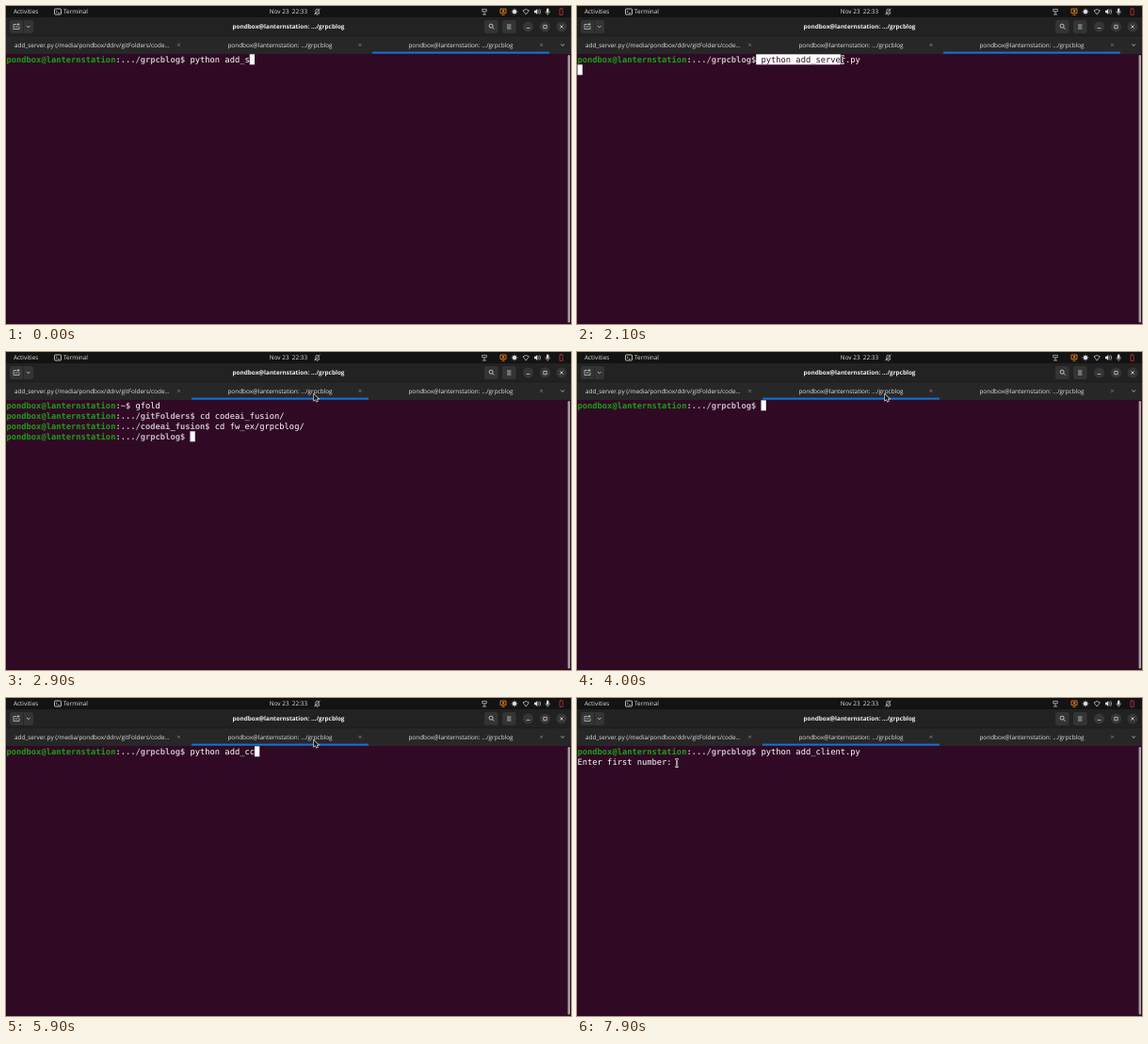
An HTML page with a canvas for the animation above (8000 ms loop, 600 by 338 pixels).

```html
<!DOCTYPE html>
<html lang="en">
<head>
<meta charset="utf-8">
<title>Terminal</title>
<style>
  html, body { margin: 0; width: 100%; height: 100%; overflow: hidden; background: #300a24; }
  canvas { display: block; width: 600px; height: 338px; }
</style>
</head>
<body>
<canvas id="stage" width="600" height="338"></canvas>
<script>
const LOOP = 8000, BLINK = 400, SWITCH = 2800;
const CELL = 5.27, ROW = 11, LEFT = 0.5, TOP = 51.3;
const USER = 'pondbox', HOST = USER + '@lanternstation';
const UI = '"Open Sans", "Noto Sans", sans-serif';
const MONO = '"DejaVu Sans Mono", monospace';
const c = document.getElementById('stage').getContext('2d');
c.textRendering = 'geometricPrecision';

// Terminal contents: each event replaces the rows; the cursor follows the last one.
const events = [];
const show = (t, ...rows) => events.push({ t, rows });
const prompt = (text, dir = '.../grpcblog') => ({ dir, text });
const output = text => ({ text });
function type(start, step, text, before = []) {
  for (let n = 1; n <= text.length; n++)
    show(start + (n - 1) * step, ...before, prompt(text.slice(0, n)));
}

const server = 'python add_server.py ', client = 'python add_client.py ';
show(0, prompt('python add_s'));
show(100, prompt('python add_se'));
show(300, prompt(server));
show(500, prompt(server), output(''));

const history = [
  prompt('gfold', '~'),
  prompt('cd codeai_fusion/', '.../gitFolders'),
  prompt('cd fw_ex/grpcblog/', '.../codeai_fusion')
];
show(SWITCH, ...history, prompt(''));
type(3100, 110, 'clear', history);
show(3800, prompt(''));
type(4500, 110, 'python add_cc');
show(6100, prompt('python add_c'));
show(6200, prompt('python add_cl'));
show(6300, prompt(client));
show(6400, prompt(client), output(''));
const asked = 7850;
show(asked, prompt(client), output('Enter first number: '));

// Mouse: time, x, y
const path = [
  [1000, 376, 190], [1800, 190, 57], [1900, 190, 57], [2100, 282, 57], [2250, 300, 58],
  [2450, 340, 193], [2700, 327, 45], [7100, 327, 45], [7500, 215, 77], [7800, 180, 67], [7900, 106, 69]
];
const select = { from: 1900, drop: 2250, until: 2450, start: 36 };

function mouseAt(t) {
  const i = path.findIndex(p => p[0] > t);
  if (i < 0) return path[path.length - 1].slice(1);
  const [t0, x0, y0] = path[i - 1], [t1, x1, y1] = path[i];
  let k = (t - t0) / (t1 - t0);
  k = k * k * (3 - 2 * k);
  return [x0 + (x1 - x0) * k, y0 + (y1 - y0) * k];
}

function rect(x, y, w, h, color) {
  c.fillStyle = color;
  c.fillRect(x, y, w, h);
}
function pill(x, y, w, h, r, color) {
  c.fillStyle = color;
  c.beginPath();
  c.roundRect(x, y, w, h, r);
  c.fill();
}
function stroke(d, color = '#e4e4e4', width = 0.8) {
  c.strokeStyle = color;
  c.lineWidth = width;
  c.stroke(new Path2D(d));
}
function fill(d, color = '#e4e4e4') {
  c.fillStyle = color;
  c.fill(new Path2D(d));
}
function text(s, x, y, color, font, align = 'left') {
  c.font = font;
  c.textAlign = align;
  c.fillStyle = color;
  c.fillText(s, x, y);
}
const label = (s, x, y, align, weight = 400, color = '#e2e2e2') =>
  text(s, x, y, color, `${weight} 6.4px ${UI}`, align);
const cross = (x, y, r, color) =>
  stroke(`M${x - r} ${y - r}l${2 * r} ${2 * r}m0 ${-2 * r}l${-2 * r} ${2 * r}`, color);

function topBar() {
  rect(0, 0, 600, 12, '#131313');
  label('Activities', 8, 8.3);
  stroke('M52.5 3h5a1 1 0 0 1 1 1v4a1 1 0 0 1-1 1h-5a1 1 0 0 1-1-1v-4a1 1 0 0 1 1-1z');
  stroke('M53 4.7l1.3 1.2l-1.3 1.2M55 7.4h2', '#e4e4e4', 0.6);
  label('Terminal', 61, 8.3);
  label('Nov 23  22:33', 300, 8.3, 'center');
  // muted bell
  stroke('M328 8h5l-.8-1.2v-1.8a1.7 1.7 0 0 0-3.4 0v1.8zM327.5 9.3l6-6.6M329.8 9.3h1.4', '#d8d8d8', 0.7);
  // network
  stroke('M505.7 3.4h4.6v2.4h-4.6zM508 5.8v3.2M506 9h4', '#cfcfcf', 0.7);
  // screen
  stroke('M525 3h6v4.6h-6zM526.5 9.3h3', '#e8801c', 0.9);
  fill('M527 4.3h2.3v2h-2.3z', '#e8801c');
  // brightness
  stroke('M540 2.6v6.8M536.6 6h6.8M537.7 3.7l4.6 4.6M542.3 3.7l-4.6 4.6', '#e4e4e4', 0.7);
  fill('M540 4a2 2 0 0 1 0 4a2 2 0 0 1 0-4z');
  // wireless
  stroke('M549 4.8q3.2-2.6 6.4 0l-3.2 4.3z', '#dcdcdc', 0.7);
  // sound
  fill('M561 4.8h1.4l1.9-1.8v6l-1.9-1.8h-1.4z');
  stroke('M565.3 4.3q1.5 1.7 0 3.4M566.6 3.2q2.3 2.8 0 5.6', '#e4e4e4', 0.6);
  // microphone
  pill(574, 2.6, 2.4, 4.4, 1.2, '#e4e4e4');
  stroke('M573 5.5q0 2.6 2.2 2.6q2.2 0 2.2-2.6M575.2 8.1v1.5', '#e4e4e4', 0.6);
  // battery
  stroke('M588 3h3.2v6.4h-3.2zM589 2.3h1.2', '#c8323c', 0.8);
}

function headerBar() {
  rect(0, 12, 600, 20, '#222222');
  pill(4, 15, 25, 14, 2.5, '#343434');
  rect(18, 15, 0.7, 14, '#222222');
  stroke('M8 19.5h3M8 19.5v5h6v-3M13 18v3M11.5 19.5h3M9.5 22h3', '#d8d8d8', 0.7);
  stroke('M22 21l1.8 1.8l1.8-1.8', '#d8d8d8');
  label(HOST + ': .../grpcblog', 300, 24.3, 'center', 700, '#f0f0f0');
  pill(508, 15, 14.5, 14, 2.5, '#343434');
  stroke('M517.1 21.2a2 2 0 1 1-4 0a2 2 0 1 1 4 0M516.6 22.7l1.8 1.8');
  pill(527, 15, 14.5, 14, 2.5, '#343434');
  stroke('M532 20h4.4M532 22h4.4M532 24h4.4', '#e4e4e4', 0.7);
  for (const x of [554.5, 572.5, 590]) pill(x - 5.5, 16.5, 11, 11, 5.5, '#363636');
  stroke('M552.7 23.5h3.6M570.8 20.4h3.4v3.4h-3.4z', '#e4e4e4', 0.7);
  cross(590, 22, 1.6);
}

function tabBar(active) {
  rect(0, 32, 600, 19, '#272727');
  rect(0, 31.6, 600, 0.6, '#1b1b1b');
  label(`add_server.py (/media/${USER}/ddrv/gitFolders/code…`, 9, 43.5);
  for (const x of [291, 483]) label(HOST + ': .../grpcblog', x, 43.5, 'center');
  for (const x of [183.5, 376, 568.5]) cross(x, 41.4, 1.4, '#858585');
  stroke('M589.2 40.5l1.9 1.9l1.9-1.9', '#d0d0d0');
  rect(5 + 192 * active, 48.6, 188, 2, '#1870d5');
}

function terminal(t) {
  rect(0, 50.6, 600, 288, '#300a24');
  pill(596.6, 52, 2.4, 284.5, 1.2, '#a99fa6');
  const { t: since, rows } = events.filter(e => e.t <= t).pop();
  const put = (s, col, row, color, weight = 400) =>
    text(s, LEFT + col * CELL, TOP + row * ROW + 8.4, color, `${weight} 8.755px ${MONO}`);
  let col = 0;
  rows.forEach(({ dir, text: s }, row) => {
    col = 0;
    if (dir) {
      const tail = `:${dir}$`;
      put(HOST, 0, row, '#15a315', 700);
      put(tail, HOST.length, row, '#c2b9c0', 700);
      col = HOST.length + tail.length + 1;
    }
    put(s, col, row, '#ffffff');
    col += s.length;
  });
  if (t >= select.from && t < select.until) {
    const [x] = mouseAt(Math.min(t, select.drop));
    const n = Math.round((x - LEFT) / CELL) - select.start;
    rect(LEFT + select.start * CELL, TOP, n * CELL, ROW, '#ffffff');
    put((' ' + server).slice(0, n), select.start, 0, '#300a24');
  }
  // The printed question leaves the blink running from the Enter key.
  const key = since === asked ? 6400 : since;
  if ((t - key) % (2 * BLINK) < BLINK)
    rect(LEFT + col * CELL, TOP + (rows.length - 1) * ROW, CELL, ROW, '#ffffff');
}

function pointer(t) {
  if (t < path[0][0]) return;
  const [x, y] = mouseAt(t);
  c.save();
  c.translate(x, y);
  if (y < 51) {
    const arrow = 'M0 0v6.6l1.6-1.4l1.2 2.6l1.2-.6l-1.2-2.5h2.1z';
    stroke(arrow, '#ffffff', 1.1);
    fill(arrow, '#161616');
  } else {
    const beam = 'M-1.7-4q1.7 0 1.7 1q0-1 1.7-1M0-3.2v6.4M-1.7 4q1.7 0 1.7-1q0 1 1.7 1';
    stroke(beam, '#f4f4f4', 2);
    stroke(beam, '#161616', 0.8);
  }
  c.restore();
}

function draw(now) {
  const t = now % LOOP;
  terminal(t);
  topBar();
  headerBar();
  tabBar(t < SWITCH ? 2 : 1);
  pointer(t);
}

let start;
function frame(now) {
  start ??= now;
  draw(now - start);
  requestAnimationFrame(frame);
}
requestAnimationFrame(frame);
</script>
</body>
</html>
```
